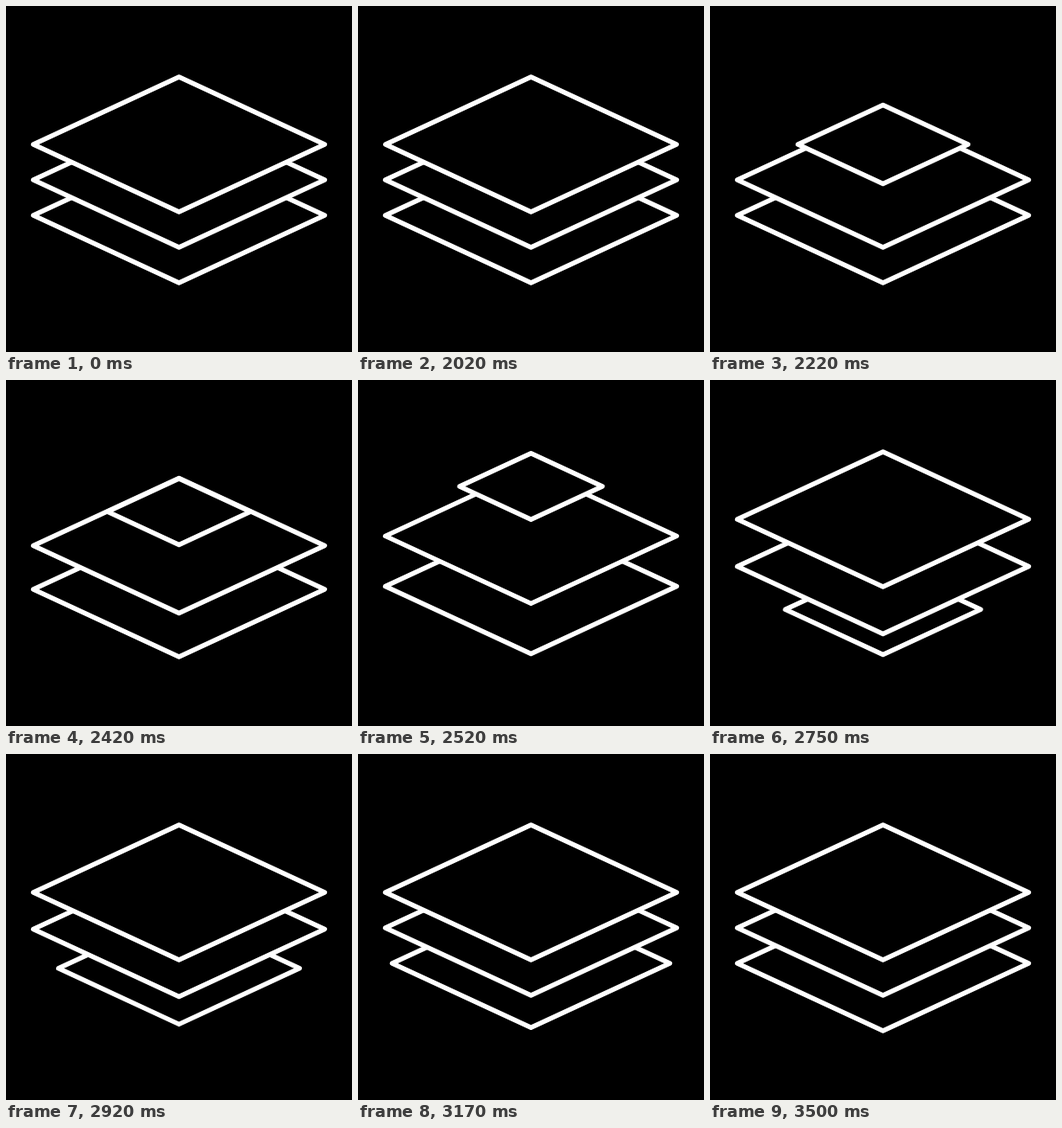
Animation of 400 by 400 pixels, one loop 3520 ms. Source, as an HTML page without scripts:

```html
<!DOCTYPE html>
<html lang="en">
<head>
<meta charset="utf-8">
<title>Layer stack</title>
<style>
  html, body { margin: 0; width: 100%; height: 100%; overflow: hidden; background: #000; }
  svg { display: block; width: 100%; height: 100%; }

  .layer {
    fill: #000;
    stroke: #fff;
    stroke-width: 5.5;
    stroke-linejoin: round;
    vector-effect: non-scaling-stroke;
    transform-origin: 0 0;
    animation: 3520ms linear infinite;
  }

  /* The leaving layer shrinks, lifts off and reappears beneath the stack. */
  .leaving  { animation-name: shrink, lift, leave; }
  .second   { animation-name: to-first; }
  .third    { animation-name: to-second; }
  .arriving { animation-name: grow, settle, arrive; }

  @keyframes shrink {
    0%, 57.1% { scale: 1; animation-timing-function: ease-in-out; }
    65.63%, 100% { scale: .49; }
  }
  @keyframes lift {
    0%, 65.63% { translate: 0 160px; animation-timing-function: cubic-bezier(.333, 0, .667, .15); }
    72.73%, 100% { translate: 0 103px; }
  }
  @keyframes leave {
    0% { visibility: visible; animation-timing-function: step-end; }
    72.8%, 100% { visibility: hidden; }
  }

  @keyframes to-first {
    0%, 63.07% { translate: 0 201px; animation-timing-function: ease-in-out; }
    80.11%, 100% { translate: 0 160px; }
  }
  @keyframes to-second {
    0%, 68.18% { translate: 0 242px; animation-timing-function: ease-in-out; }
    85.23%, 100% { translate: 0 201px; }
  }

  @keyframes grow {
    0%, 71.31% { scale: .49; animation-timing-function: cubic-bezier(.25, .1, .3, 1); }
    100% { scale: 1; }
  }
  @keyframes settle {
    0%, 72.73% { translate: 0 299px; animation-timing-function: cubic-bezier(.25, .3, .3, 1); }
    89.77%, 100% { translate: 0 242px; }
  }
  @keyframes arrive {
    0% { visibility: hidden; animation-timing-function: step-end; }
    72.8%, 100% { visibility: visible; }
  }
</style>
</head>
<body>
<svg viewBox="0 0 400 400">
  <g transform="translate(200 0)">
    <path class="layer arriving" d="M0-78 168.4 0 0 78-168.4 0Z"/>
    <path class="layer third" d="M0-78 168.4 0 0 78-168.4 0Z"/>
    <path class="layer second" d="M0-78 168.4 0 0 78-168.4 0Z"/>
    <path class="layer leaving" d="M0-78 168.4 0 0 78-168.4 0Z"/>
  </g>
</svg>
</body>
</html>
```
